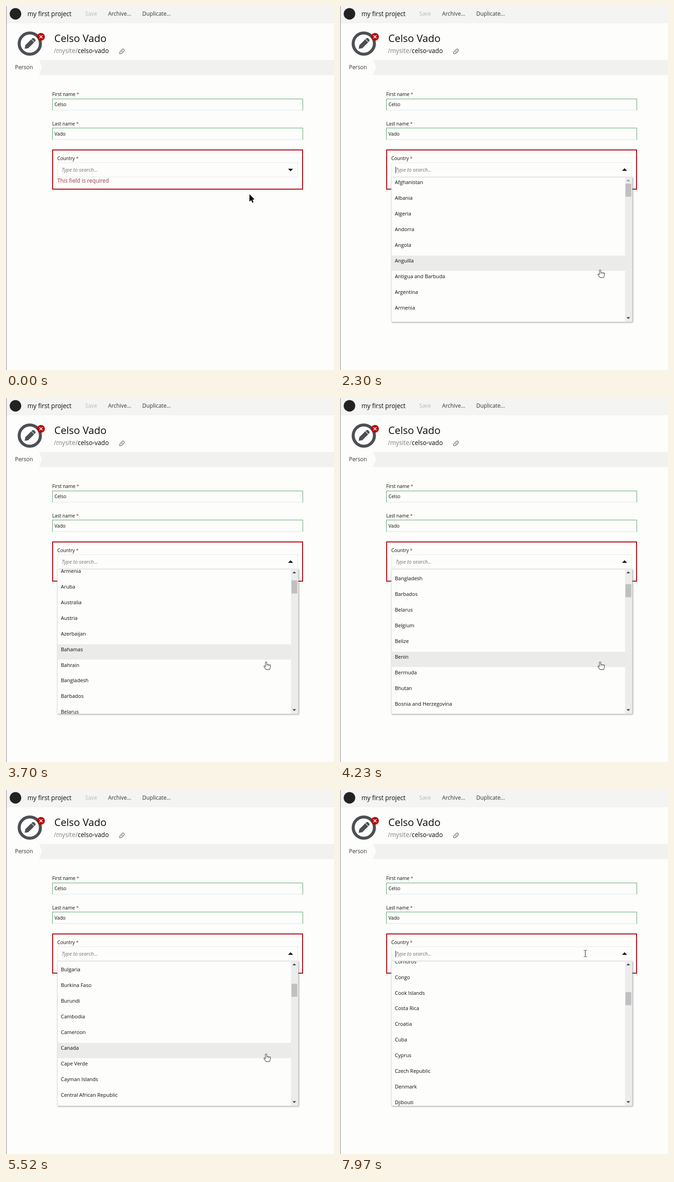
An HTML page with a canvas for the animation above (8 s loop, 710 by 789 pixels).

```html
<!DOCTYPE html>
<html lang="en">
<head>
<meta charset="utf-8">
<title>Country picker</title>
<style>
html, body { margin: 0; width: 100%; height: 100%; overflow: hidden; background: #fdfdfc; }
canvas { display: block; width: 710px; height: 789px; }
</style>
</head>
<body>
<canvas id="stage"></canvas>
<script>
const W = 710, H = 789, LOOP = 8000;
const canvas = document.getElementById('stage');
const dpr = window.devicePixelRatio || 1;
canvas.width = W * dpr;
canvas.height = H * dpr;
const ctx = canvas.getContext('2d');

const PAPER = '#fdfdfc', INK = '#0c0c0c', RED = '#ad0009';
const EM = 0.8487;            // the page is shown at this zoom
const ROW = 40 * EM;
const LIST = { x: 111, y: 371.3, w: 521.5, h: 313.7 };
const OPEN_AT = 1040, LOADED_AT = 1460, REFOCUS_AT = 7880;

const countries = ('Afghanistan,Albania,Algeria,Andorra,Angola,Anguilla,Antigua and Barbuda,' +
  'Argentina,Armenia,Aruba,Australia,Austria,Azerbaijan,Bahamas,Bahrain,Bangladesh,Barbados,' +
  'Belarus,Belgium,Belize,Benin,Bermuda,Bhutan,Bosnia and Herzegovina,Botswana,Brazil,' +
  'British Virgin Islands,Brunei,Bulgaria,Burkina Faso,Burundi,Cambodia,Cameroon,Canada,' +
  'Cape Verde,Cayman Islands,Central African Republic,Chad,Chile,China,Christmas Island,' +
  'Colombia,Comoros,Congo,Cook Islands,Costa Rica,Croatia,Cuba,Cyprus,Czech Republic,' +
  'Denmark,Djibouti,Dominica,Dominican Republic,Ecuador').split(',');

// [start, end, value...] moves, eased in and out
const scrolls = [[3100, 4235, 500.2], [4600, 5520, 943.4], [5520, 6700, 1436.2]];
const moves = [[250, 1000, 608, 360], [1680, 2160, 563, 572], [7060, 7840, 531, 354.5]];

const ease = p => p < 0.5 ? 2 * p * p : 1 - 2 * (1 - p) ** 2;

function track(keys, start, t) {
  let now = start;
  for (const [from, to, ...goal] of keys) {
    const p = ease(Math.min(1, Math.max(0, (t - from) / (to - from))));
    now = now.map((v, i) => v + (goal[i] - v) * p);
  }
  return now;
}

function rect(x, y, w, h, color) {
  ctx.fillStyle = color;
  ctx.fillRect(x, y, w, h);
}

function disc(x, y, r, color) {
  ctx.beginPath();
  ctx.arc(x, y, r, 0, 7);
  ctx.fillStyle = color;
  ctx.fill();
}

function poly(points, fill, stroke, width = 1) {
  ctx.beginPath();
  points.forEach(([x, y]) => ctx.lineTo(x, y));
  ctx.closePath();
  if (stroke) {
    ctx.strokeStyle = stroke;
    ctx.lineWidth = width;
    ctx.stroke();
  }
  if (fill) {
    ctx.fillStyle = fill;
    ctx.fill();
  }
}

function text(str, x, y, px, color = INK, style = '') {
  ctx.font = `${style} ${px * EM}px "Open Sans", "Noto Sans", sans-serif`;
  ctx.fillStyle = color;
  ctx.fillText(str, x, y);
  return x + ctx.measureText(str).width;
}

function label(str, x, y) {
  const end = text(str + ' ', x, y, 12);
  text('*', end, y, 12, '#b3303c');
}

function triangle(x, y, half, h, color) {
  poly([[x - half, y - h / 2], [x + half, y - h / 2], [x, y + h / 2]], color);
}

function at(x, y, angle, paint) {
  ctx.save();
  ctx.translate(x, y);
  ctx.rotate(angle);
  paint();
  ctx.restore();
}

function header() {
  rect(0, 0, W, 36, '#f4f4f3');
  rect(0, 36, W, 1, '#eeeeed');
  disc(20.5, 17, 12.5, '#222');
  text('my first project', 46.5, 22, 16);
  text('Save', 171.5, 21, 14, '#b8b8b8');
  text('Archive...', 221, 21, 14, '#333');
  text('Duplicate...', 295, 21, 14, '#333');

  ctx.beginPath();
  ctx.arc(51.5, 81.5, 23, 0, 7);
  ctx.strokeStyle = '#4c5054';
  ctx.lineWidth = 6.5;
  ctx.stroke();
  at(51.8, 81.5, -Math.PI / 4, () => {
    poly([[-16, 0], [-9.5, -4.6], [8.5, -4.6], [8.5, 4.6], [-9.5, 4.6]], '#4c5054');
    poly([[9.6, -4.6], [12.5, -4.6], [14.5, -2.5], [14.5, 2.5], [12.5, 4.6], [9.6, 4.6]], '#4c5054');
  });
  disc(75.8, 66.8, 8.4, '#b5050c');
  at(75.8, 66.8, Math.PI / 4, () => {
    rect(-4.6, -0.8, 9.2, 1.6, '#fff');
    rect(-0.8, -4.6, 1.6, 9.2, '#fff');
  });

  text('Celso Vado', 104.5, 78, 26);
  const end = text('/mysite/', 103.5, 102, 16, '#808080');
  text('celso-vado', end, 102, 16);
  at(251, 98.5, -Math.PI / 4, () => {
    poly([[-7, 0], [-4, -2.6], [5, -2.6], [6.2, -1.4], [6.2, 1.4], [5, 2.6], [-4, 2.6]], null, '#444', 1);
    rect(-3, -0.4, 6.5, 0.8, '#666');
  });

  poly([[71.5, 117], [W, 117], [W, 149.5], [71.5, 149.5], [78, 133]], '#f1f1f0');
  text('Person', 19.5, 137, 14, '#333');
}

function field(name, value, y, bottom) {
  label(name, 100, bottom - 31);
  rect(100, y, 543, bottom - y, '#5aa268');
  rect(101, y + 1, 541, bottom - y - 1, PAPER);
  rect(101, bottom - 1, 541, 1, '#dbe7e2');
  text(value, 105, bottom - 9, 12);
}

function combo(open, caret) {
  ctx.strokeStyle = RED;
  ctx.lineWidth = 2;
  ctx.strokeRect(101, 312, 541, 85);
  label('Country', 111, 334);
  ctx.strokeStyle = '#e8e8ea';
  ctx.lineWidth = 1;
  ctx.strokeRect(111.5, 339.5, 520, 31);
  text('Type to search...', 120.5, 359, 13, '#707070', 'italic');
  if (caret) rect(120, 348.5, 1, 14, '#222');
  triangle(616, open ? 354.5 : 355.5, 5.3, open ? -5.5 : 5.5, '#000');
  if (!open) text('This field is required', 111, 383, 14, '#a3363c');
}

function panel(h) {
  const { x, y, w } = LIST;
  ctx.save();
  ctx.shadowColor = 'rgba(0,0,0,.38)';
  ctx.shadowBlur = 3 * dpr;
  ctx.shadowOffsetX = ctx.shadowOffsetY = dpr;
  rect(x, y, w, h, PAPER);
  ctx.restore();
  ctx.strokeStyle = '#e2e2e4';
  ctx.lineWidth = 1;
  ctx.strokeRect(x + 0.5, y - 0.5, w - 1, h);
}

function list(scroll, pointer) {
  const { x, y, h } = LIST;
  panel(h);
  ctx.save();
  ctx.beginPath();
  ctx.rect(x, y, 506, h - 1);
  ctx.clip();
  const over = pointer[1] > y ? Math.floor((pointer[1] - 5 - y + scroll) / ROW) : -1;
  countries.forEach((name, i) => {
    const top = y + i * ROW - scroll;
    if (top < y - ROW || top > y + h) return;
    if (i === over) rect(x + 1, top, 505, ROW - 0.8, '#ebebea');
    text(name, x + 7.7, top + 14.7, 13);
  });
  ctx.restore();

  rect(617, y, 14.5, h - 1, '#ececec');
  rect(618, 385 + scroll / 27, 12.5, 28.3, '#c0c0c0');
  triangle(624, 378, 4, -4, scroll < 1 ? '#9a9a9a' : '#444');
  triangle(624, 676.5, 4, 4, '#444');
}

function arrow() {
  poly([[0, 0], [0, 16], [3.7, 12.7], [6.2, 18.6], [8.8, 17.5], [6.3, 11.7], [11, 11.3]],
    '#000', '#fff', 2);
}

function hand() {
  ctx.beginPath();
  ctx.moveTo(-1.5, 1.2);
  ctx.quadraticCurveTo(0, -1, 1.5, 1.2);
  ctx.lineTo(1.5, 5.5);
  for (const x of [4.4, 7.2, 9.6]) ctx.quadraticCurveTo(x - 1.3, 4.6 + x / 9, x, 6 + x / 9);
  ctx.lineTo(9.4, 11.5);
  ctx.lineTo(7.6, 16.7);
  ctx.lineTo(0, 16.7);
  ctx.lineTo(-4.8, 10.2);
  ctx.quadraticCurveTo(-4.6, 7.8, -1.5, 10);
  ctx.closePath();
  ctx.fillStyle = '#fff';
  ctx.fill();
  ctx.strokeStyle = '#55555a';
  ctx.lineWidth = 1.2;
  ctx.stroke();
  for (const x of [1.5, 4.3, 7]) rect(x - 0.4, 6, 0.9, 3.5, '#77777c');
}

function beam() {
  rect(-0.6, -7, 1.3, 14, '#444');
  for (const y of [-7.5, 6.5]) {
    rect(-3.5, y, 2.9, 1, '#444');
    rect(0.7, y, 2.9, 1, '#444');
  }
}

function pointerShape([x, y], loaded) {
  if (loaded && y > LIST.y) return hand;
  if (y < 339 || y > LIST.y) return arrow;
  return x > 600 ? hand : beam;
}

function caretOn(t) {
  if (t >= REFOCUS_AT) return true;
  return t >= OPEN_AT && t < 2900 && Math.floor((t - OPEN_AT) / 530) % 2 === 0;
}

function draw(t) {
  const open = t >= OPEN_AT, loaded = t >= LOADED_AT;
  const pointer = track(moves, [527, 408], t);
  const [scroll] = track(scrolls, [0], t);

  ctx.setTransform(dpr, 0, 0, dpr, 0, 0);
  rect(0, 0, W, H, PAPER);
  header();
  field('First name', 'Celso', 201, 226);
  field('Last name', 'Vado', 264, 290);
  combo(open, caretOn(t));
  if (loaded) {
    list(scroll, pointer);
  } else if (open) {
    panel(14);
    text('Searching...', 111.8, 381, 12);
  }
  rect(0, 0, 1.5, H, '#ababab');
  at(...pointer, 0, pointerShape(pointer, loaded));
}

const begin = performance.now();
function tick() {
  draw((performance.now() - begin) % LOOP);
  requestAnimationFrame(tick);
}
tick();
</script>
</body>
</html>
```
